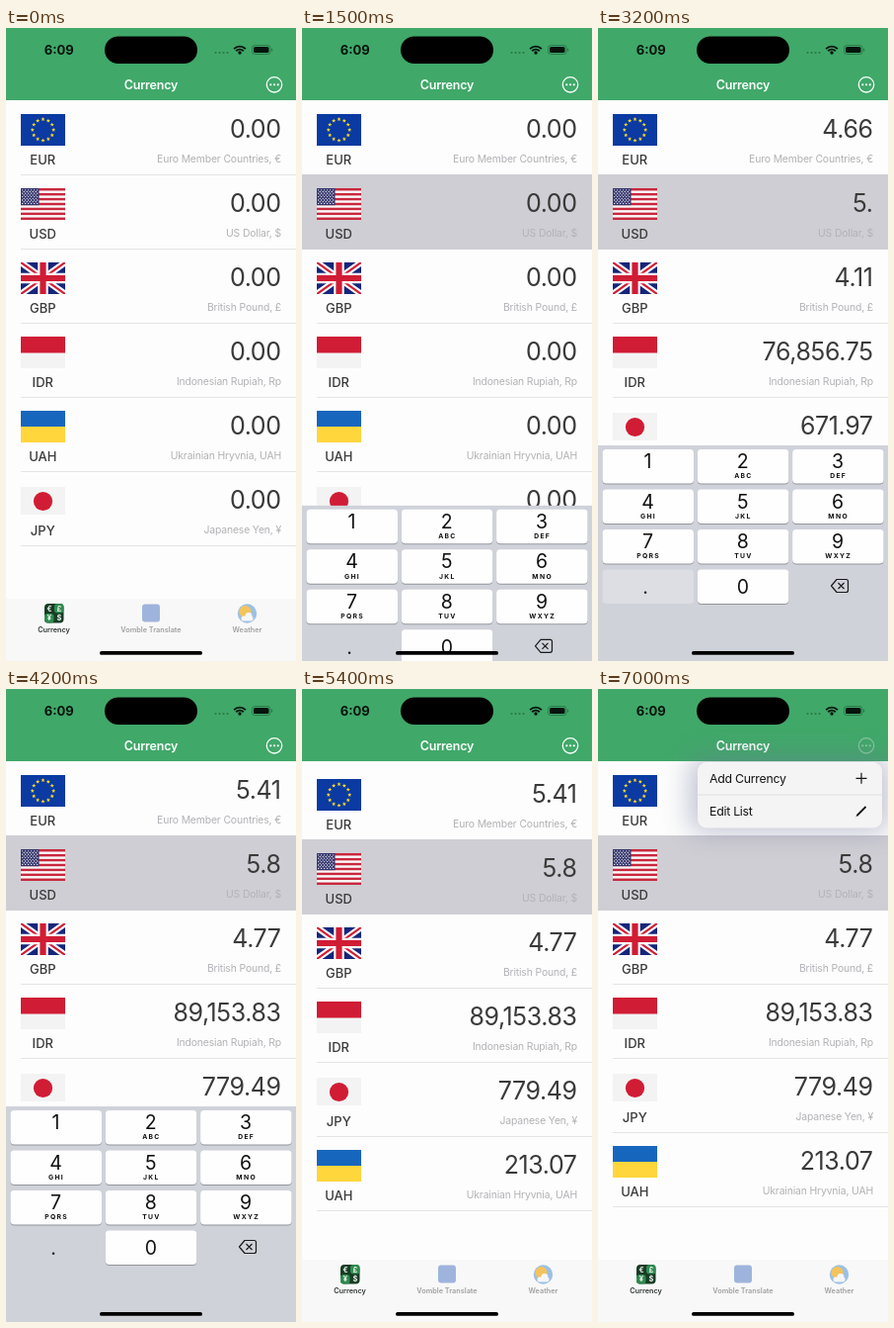
Recreate the animation shown at these times as an HTML page. Size 294 by 640 pixels, loop 8 s.

```html
<!DOCTYPE html>
<html lang="en">
<head>
<meta charset="utf-8">
<title>Currency</title>
<style>
html, body { margin: 0; width: 100%; height: 100%; overflow: hidden; background: #fdfdfd; }
svg { display: block; width: 294px; height: 640px; font-family: Inter, "Open Sans", sans-serif; }
.mid { text-anchor: middle; }
.value { font-size: 25px; letter-spacing: -.4px; text-anchor: end; fill: #3a3a3a; }
.note { font-size: 10.4px; letter-spacing: -.15px; text-anchor: end; fill: #b2b2b6; }
.code { font-size: 13px; font-weight: 500; fill: #3a3a3a; }
.tab { font-size: 7.3px; font-weight: 600; fill: #a0a0a2; }
.digit { font-size: 19.5px; fill: #111; }
.abc { font-size: 6.8px; font-weight: 700; letter-spacing: 1.3px; fill: #111; }
.item { font-size: 12.3px; letter-spacing: -.25px; fill: #141414; }
</style>
</head>
<body>
<svg id="stage" viewBox="0 0 294 640"></svg>
<script>
const LOOP = 8000, ROW = 75, TOP = 73, KEYS_Y = 422;
const PAPER = '#fdfdfd', GREEN = '#40a869', INK = '#06140c', RED = '#d01c34';

const rect = (x, y, w, h, fill, more = '') =>
  `<rect x="${x}" y="${y}" width="${w}" height="${h}" fill="${fill}" ${more}/>`;
const circle = (x, y, r, fill, more = '') =>
  `<circle cx="${x}" cy="${y}" r="${r}" fill="${fill}" ${more}/>`;
const line = (d, color, width, more = '') =>
  `<path d="${d}" fill="none" stroke="${color}" stroke-width="${width}" ${more}/>`;
const text = (x, y, cls, s, more = '') => `<text x="${x}" y="${y}" class="${cls}" ${more}>${s}</text>`;
const times = (n, f) => Array.from({length: n}, (_, i) => f(i)).join('');

function star(cx, cy, r) {
  const pts = times(10, i => {
    const a = i * Math.PI / 5, d = i % 2 ? r * .42 : r;
    return `${(cx + d * Math.sin(a)).toFixed(2)},${(cy - d * Math.cos(a)).toFixed(2)} `;
  });
  return `<polygon points="${pts}" fill="#ffdc28"/>`;
}

// Flags are 45 x 32 with the origin at their top left corner.
const flags = {
  EUR: rect(0, 0, 45, 32, '#0a3aa2') + times(12, i =>
    star(22.5 + 10.7 * Math.sin(i * Math.PI / 6), 16 - 10.7 * Math.cos(i * Math.PI / 6), 2.2)),
  USD: rect(0, 0, 45, 32, '#fafafa') +
    times(7, i => rect(0, i * 64 / 13, 45, 32 / 13, '#c8283e')) +
    rect(0, 0, 18.5, 17.2, '#34366e') +
    times(9, j => times(j % 2 ? 5 : 6, i =>
      circle(1.7 + i * 3 + (j % 2) * 1.5, 1.8 + j * 1.7, .65, '#f2f2f4'))),
  GBP: rect(0, 0, 45, 32, '#14267c') +
    line('M0 0L45 32M45 0L0 32', '#fafafa', 6.4) +
    line('M0 0L45 32M45 0L0 32', RED, 2.2) +
    line('M22.5 0V32M0 16H45', '#fafafa', 10.5) +
    line('M22.5 0V32M0 16H45', RED, 6.2),
  IDR: rect(0, 0, 45, 32, '#f3f3f3') + rect(0, 0, 45, 16.5, RED),
  UAH: rect(0, 0, 45, 32, '#ffd63c') + rect(0, 0, 45, 16, '#1766be'),
  JPY: rect(0, 2, 45, 28, '#f3f3f3') + circle(22.5, 16.5, 9.6, RED)
};

// code, description, rate to one dollar
const currencies = [
  ['EUR', 'Euro Member Countries, €', 5.41 / 5.8],
  ['USD', 'US Dollar, $', 1],
  ['GBP', 'British Pound, £', 4.77 / 5.8],
  ['IDR', 'Indonesian Rupiah, Rp', 89153.83 / 5.8],
  ['UAH', 'Ukrainian Hryvnia, UAH', 213.07 / 5.8],
  ['JPY', 'Japanese Yen, ¥', 779.49 / 5.8]
];

const row = ([code, note], i) => `<g id="row${i}">
  ${line('M15 75.5H294', '#e4e4e6', 1)}
  ${code === 'USD' ? rect(0, 0, 294, ROW + 1, '#cfced4', 'id="selected"') : ''}
  <g transform="translate(15 14)"><svg width="45" height="32">${flags[code]}</svg></g>
  ${text(37.3, 65, 'code mid', code)}
  ${text(278.6, 38, 'value', '0.00', `id="value${i}"`)}
  ${text(279, 62.5, 'note', note)}
</g>`;

const letters = ['', 'ABC', 'DEF', 'GHI', 'JKL', 'MNO', 'PQRS', 'TUV', 'WXYZ'];

function key(label, col, line, sub, bare) {
  const x = 4.5 + col * 96.3, y = 4 + line * 40.5, mid = x + 46;
  const id = label === '.' ? 'Dot' : label;
  const cap = bare ? '' :
    rect(x, y + 1, 92.5, 34.5, '#94969c', 'rx="4"') + rect(x, y, 92.5, 34.5, '#fefefe', 'rx="4"');
  return cap + rect(x, y, 92.5, 34.5, bare ? '#fefefe' : '#b3becb', `rx="4" opacity="0" id="key${id}"`) +
    text(bare ? mid - 2.5 : mid, y + (sub === undefined ? 24.5 : 19), 'digit mid', label) +
    (sub ? text(mid + .6, y + 29.3, 'abc mid', sub) : '');
}

const keyboard = rect(0, 0, 294, 220, '#d0d2da') +
  letters.map((s, i) => key(String(i + 1), i % 3, Math.floor(i / 3), s)).join('') +
  key('.', 0, 3, undefined, true) + key('0', 1, 3) +
  line('M242 135.5H251.5Q253.5 135.5 253.5 137.5V146.5Q253.5 148.5 251.5 148.5H242L236.5 142Z' +
    'M243.5 139L249.5 145M249.5 139L243.5 145', '#1a1a1a', 1.2, 'stroke-linejoin="round"');

const tabs = rect(0, 577, 294, 63, '#f8f8f8') +
  rect(39, 582, 19.5, 19.5, '#173c24', 'rx="4"') +
  rect(49, 582, 9.5, 9.5, '#2f8a50', 'rx="3"') + rect(39, 592, 9.5, 9.5, '#2f8a50', 'rx="3"') +
  ['€', '£', '¥', '$'].map((s, i) => text(44 + i % 2 * 10, 589.6 + (i >> 1) * 9.6, 'mid', s,
    'font-size="7.5" font-weight="700" fill="#f0f6f0"')).join('') +
  rect(138, 582.5, 18, 18, '#9fb4dc', 'rx="3"') +
  circle(244.5, 592, 9.7, '#9cc0e4') + circle(242.5, 590, 6, '#f4c45c') +
  line('M241 597H248', '#f6f6f6', 5, 'stroke-linecap="round"') + circle(246, 594.5, 3.4, '#f6f6f6') +
  text(48.5, 611.3, 'tab mid', 'Currency', 'style="fill:#333a36"') +
  text(147, 611.3, 'tab mid', 'Vomble Translate') +
  text(244.5, 611.3, 'tab mid', 'Weather');

const header = rect(0, 0, 294, TOP, GREEN) +
  text(147, 61.5, 'mid', 'Currency',
    'font-size="12.5" font-weight="600" letter-spacing="-.2" fill="#fafffb"') +
  `<g id="more">${circle(272, 57.3, 7.7, 'none', 'stroke="#fafffb" stroke-width="1.3"')}
  ${times(3, i => circle(268.3 + i * 3.7, 57.3, 1.15, '#fafffb'))}</g>`;

const arc = r => `M${237 - r * .72} ${27 - r * .72}A${r} ${r} 0 0 1 ${237 + r * .72} ${27 - r * .72}`;
const status = text(53.7, 27, 'mid', '6:09', `font-size="13" font-weight="700" fill="${INK}"`) +
  rect(100, 8.5, 94, 27.5, '#000', 'rx="13.75"') +
  times(4, i => circle(212.5 + i * 4, 25, 1.1, '#2a7a4a')) +
  line(arc(8.2) + arc(5.2), INK, 1.9) + circle(237, 25, 1.7, INK) +
  rect(249.5, 17.5, 18.5, 9, 'none', 'rx="2.8" stroke="#2a7a4a"') +
  rect(251, 19, 15.5, 6, INK, 'rx="1.5"') + rect(269, 20.5, 1.2, 3, '#2a7a4a', 'rx=".6"') +
  rect(95, 630, 104, 3.8, '#000', 'rx="1.9"');

const menu = rect(94, 70, 200, 74, '#70749a', 'opacity=".45" filter="url(#blur)"') +
  rect(101, 74, 187, 66.5, '#f4f4f5', 'rx="9"') +
  line('M101 107H288', '#d8d8da', .8) +
  text(113, 94.5, 'item', 'Add Currency') + text(113, 127.5, 'item', 'Edit List') +
  line('M261.5 90.3H272.5M267 84.8V95.8', '#141414', 1.2) +
  line('M262.5 128L271.5 119', '#141414', 1.8) + line('M261.7 128.8L263 127.5', '#141414', 1);

document.getElementById('stage').innerHTML =
  `<defs><filter id="blur" x="-50%" y="-100%" width="200%" height="300%">
    <feGaussianBlur stdDeviation="14"/></filter></defs>` +
  rect(0, 0, 294, 640, PAPER) +
  currencies.map(row).join('') + header + tabs +
  rect(0, KEYS_Y, 294, 640 - KEYS_Y, PAPER, 'id="inset"') +
  `<g id="menu">${menu}</g><g id="keyboard">${keyboard}</g>` + status;

const $ = id => document.getElementById(id);
const set = (id, name, v) => $(id).setAttribute(name, v);
const show = (id, on) => set(id, 'visibility', on ? 'visible' : 'hidden');
const ramp = (t, from, to) => Math.min(1, Math.max(0, (t - from) / (to - from)));
const ease = (t, from, to) => (1 - Math.cos(Math.PI * ramp(t, from, to))) / 2;
const spring = (t, from, w) => {
  const x = Math.max(0, t - from) / 1000 * w;
  return 1 - (1 + x) * Math.exp(-x);
};
const money = n => n.toLocaleString('en-US', {minimumFractionDigits: 2, maximumFractionDigits: 2});
const press = (t, down, up) => t < down ? 0 : t < up ? 1 : 1 - ramp(t, up - 100, up + 300);

function pull(t) {
  if (t >= 6100) return 0;
  return t < 5000 ? 35 * ease(t, 4700, 5000) : 35 - 31 * ease(t, 5000, 5400);
}

function draw(t) {
  const typed = t < 2300 ? '0.00' : t < 3000 ? '5' : t < 3900 ? '5.' : '5.8';
  const swap = ease(t, 2300, 2600);
  currencies.forEach(([code, , rate], i) => {
    const place = i + (code === 'UAH' ? swap : code === 'JPY' ? -swap : 0);
    set('row' + i, 'transform', `translate(0 ${TOP + place * ROW + pull(t)})`);
    $('value' + i).textContent = code === 'USD' ? typed : money(parseFloat(typed) * rate);
  });
  set('selected', 'opacity', ramp(t, 1000, 1200));

  // The list ends at the keyboard's resting edge until the keyboard is dismissed.
  show('inset', t >= 1900 && t < 5100);
  const shown = t < 1900 ? spring(t, 1300, 12.7) : 1 - ease(t, 4950, 5400);
  set('keyboard', 'transform', `translate(0 ${640 - (640 - KEYS_Y) * shown})`);
  show('keyboard', shown > 0);
  set('key5', 'opacity', press(t, 2100, 2300));
  set('keyDot', 'opacity', press(t, 2900, 3000));
  set('key8', 'opacity', press(t, 3700, 3900));

  const open = t < 7000 ? spring(t, 6300, 11) : 1;
  set('menu', 'opacity', Math.min(1, open * 1.3));
  set('menu', 'transform', `translate(272 66) scale(${.2 + .8 * open}) translate(-272 -66)`);
  set('more', 'opacity', 1 - .65 * ramp(t, 6200, 6400));
}

const start = performance.now();
function tick() {
  const t = (performance.now() - start) % LOOP;
  draw(Math.floor(t / 100) * 100);
  requestAnimationFrame(tick);
}
tick();
</script>
</body>
</html>
```
